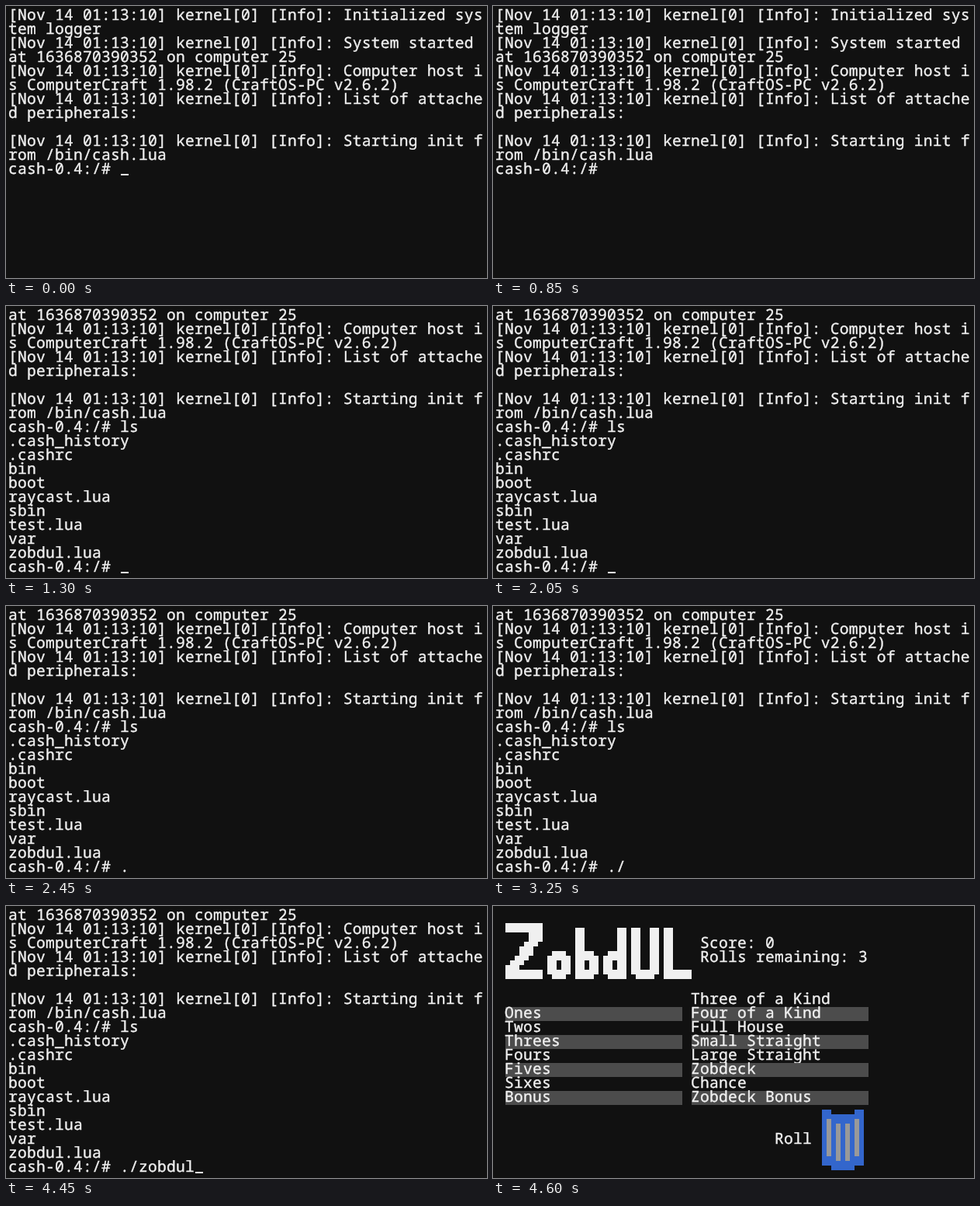
An HTML page for the animation above (8 s loop, 620x350 px).

```html
<!DOCTYPE html>
<html lang="en">
<head>
<meta charset="utf-8">
<title>Terminal dice game</title>
<style>
  html, body { margin: 0; width: 100%; height: 100%; overflow: hidden; background: #111; }
  svg { display: block; width: 620px; height: 350px; background: #111; }
  text {
    font: 500 19.6px "Noto Sans Mono", "DejaVu Sans Mono", monospace;
    letter-spacing: 0.24px;
    white-space: pre;
    stroke: #f0f0f0;
    stroke-width: 0.4px;
    text-rendering: geometricPrecision;
  }
  text, rect { fill: #f0f0f0; }
  rect { shape-rendering: crispEdges; }
</style>
</head>
<body>
<svg viewBox="0 0 620 350">
  <g id="shell"></g>
  <g id="game"></g>
</svg>
<script>
const LOOP = 8000, LIST_AT = 1300, GAME_AT = 4600;
const COLS = 51, ROWS = 19, CELL_W = 12, CELL_H = 18, PAD = 4, BLOCK = 6;
const GRAY = '#4c4c4c', LIGHT = '#999999', BLUE = '#3366cc';
const PROMPT = 'cash-0.4:/# ';
const shell = document.getElementById('shell');
const game = document.getElementById('game');

function add(parent, tag, attrs) {
  const el = document.createElementNS('http://www.w3.org/2000/svg', tag);
  for (const key in attrs) el.setAttribute(key, attrs[key]);
  return parent.appendChild(el);
}

function box(parent, x, y, width, height, color) {
  const el = add(parent, 'rect', { x, y, width, height });
  if (color) el.style.fill = color;
  return el;
}

function label(parent, col, row, str) {
  const el = add(parent, 'text', { x: PAD - 1 + col * CELL_W, y: PAD + 14 + row * CELL_H });
  el.textContent = str;
  return el;
}

// Shell
const stamp = '[Nov 14 01:13:10] kernel[0] [Info]: ';
const wrap = line => line.match(new RegExp(`.{1,${COLS}}`, 'g')) || [''];
const log = [
  stamp + 'Initialized system logger',
  stamp + 'System started at 1636870390352 on computer 25',
  stamp + 'Computer host is ComputerCraft 1.98.2 (CraftOS-PC v2.6.2)',
  stamp + 'List of attached peripherals:',
  '',
  stamp + 'Starting init from /bin/cash.lua'
].flatMap(wrap);
const files = ['.cash_history', '.cashrc', 'bin', 'boot', 'raycast.lua',
  'sbin', 'test.lua', 'var', 'zobdul.lua'];

const firstKeys = [[900, 'l'], [1000, 's']];
const secondKeys = [[2450, '.'], [2550, '/'], [3500, 'zo'], [3650, 'b'],
  [3700, 'd'], [4000, 'u'], [4150, 'l']];

const typed = (keys, t) => keys.filter(k => k[0] <= t).map(k => k[1]).join('');

const lines = Array.from({ length: ROWS }, (_, row) => label(shell, 0, row, ''));
const cursor = box(shell, 0, 0, 10, 2);

function drawShell(t) {
  const listed = t >= LIST_AT;
  const input = PROMPT + typed(listed ? secondKeys : firstKeys, t);
  const all = listed ? [...log, PROMPT + 'ls', ...files, input] : [...log, input];
  const view = all.slice(-ROWS);
  lines.forEach((el, row) => {
    const str = view[row] || '';
    if (el.textContent !== str) el.textContent = str;
  });
  const blinkOn = Math.floor((t - 50) / 400) % 2 !== 0;
  cursor.setAttribute('x', PAD + input.length * CELL_W);
  cursor.setAttribute('y', PAD + (view.length - 1) * CELL_H + 14);
  cursor.style.display = blinkOn ? '' : 'none';
}

// Game screen, laid out in blocks and text cells
function blocks(left, top, list, color) {
  for (const [x, y, w, h] of list)
    box(game, left + x * BLOCK, top + y * BLOCK, w * BLOCK, h * BLOCK, color);
}

function buildTitle() {
  const slash = Array.from({ length: 8 }, (_, i) => [5 - Math.floor(i * 0.72), 2 + i, 3, 1]);
  const bowl = x => [[x + 1, 6, 3, 2], [x + 1, 10, 3, 2], [x, 7, 2, 4], [x + 3, 7, 2, 4]];
  blocks(16, 22, [
    [0, 0, 8, 2], ...slash, [0, 10, 8, 2],
    ...bowl(9),
    [15, 1, 2, 11], ...bowl(15),
    ...bowl(21), [24, 1, 2, 11],
    [27, 1, 2, 10], [31, 1, 2, 10], [28, 10, 4, 2],
    [34, 1, 2, 11], [34, 10, 6, 2]
  ]);
}

function buildScores(col, firstRow, names) {
  names.forEach((name, i) => {
    const row = firstRow + i;
    if (row % 2) box(game, PAD + col * CELL_W, PAD + row * CELL_H, 19 * CELL_W, CELL_H, GRAY);
    label(game, col, row, name);
  });
}

function buildCup() {
  blocks(424, 262, [[0, 0, 2, 1], [7, 0, 2, 1], [0, 1, 9, 11], [2, 12, 5, 1]], BLUE);
  blocks(424, 262, [[1, 2, 1, 8], [3, 3, 1, 8], [5, 3, 1, 8], [7, 2, 1, 8]], LIGHT);
}

buildTitle();
label(game, 22, 2, 'Score: 0');
label(game, 22, 3, 'Rolls remaining: 3');
buildScores(1, 7, ['Ones', 'Twos', 'Threes', 'Fours', 'Fives', 'Sixes', 'Bonus']);
buildScores(21, 6, ['Three of a Kind', 'Four of a Kind', 'Full House', 'Small Straight',
  'Large Straight', 'Zobdeck', 'Chance', 'Zobdeck Bonus']);
label(game, 30, 16, 'Roll');
buildCup();

function draw(t) {
  const playing = t >= GAME_AT;
  shell.style.display = playing ? 'none' : '';
  game.style.display = playing ? '' : 'none';
  if (!playing) drawShell(t);
}

let start;
function tick(now) {
  if (start === undefined) start = now;
  draw((now - start) % LOOP);
  requestAnimationFrame(tick);
}
draw(0);
requestAnimationFrame(tick);
</script>
</body>
</html>
```
